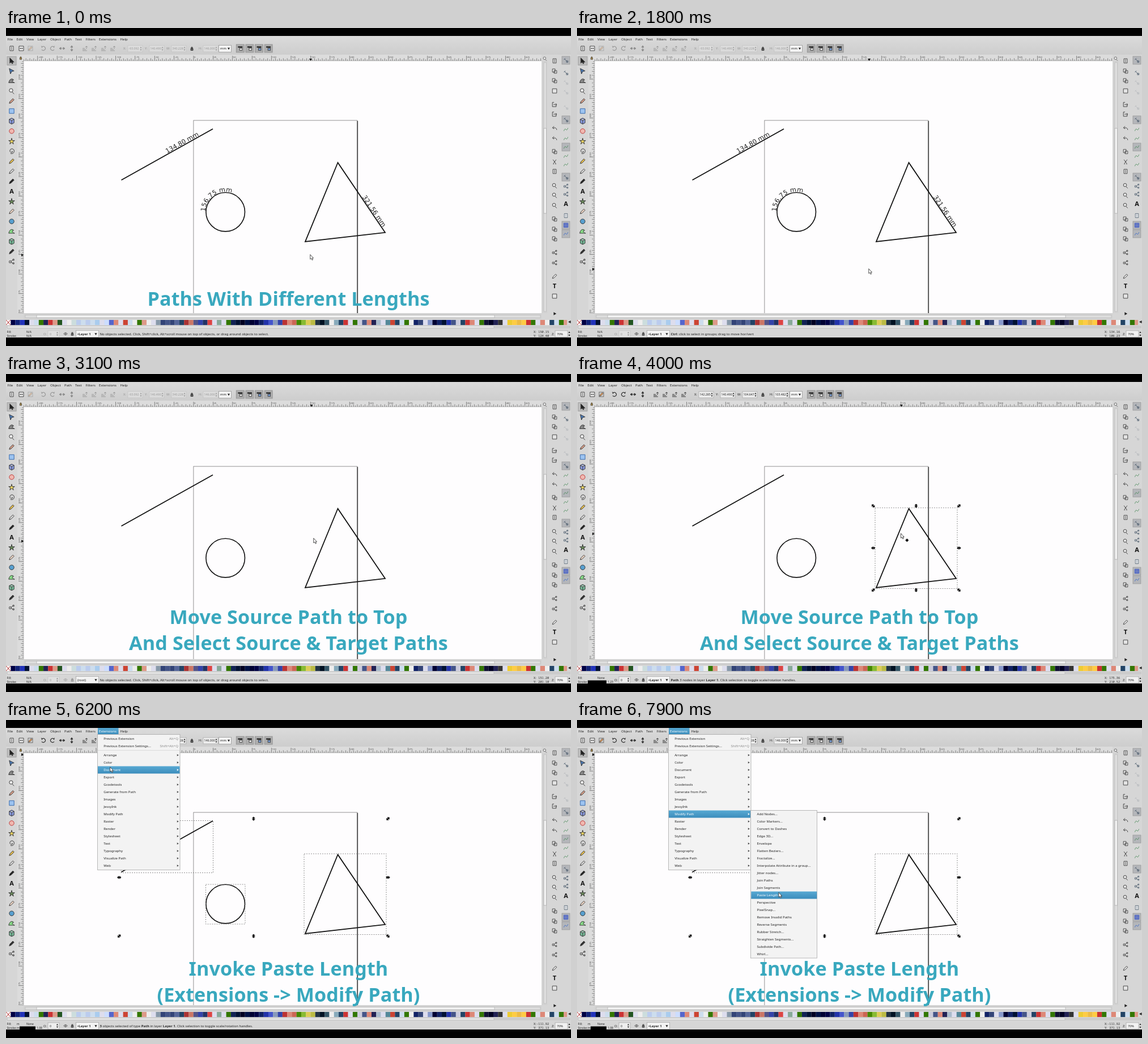
Recreate the animation shown at these times as an HTML page with a canvas. Size 997 by 561 pixels, loop 8000 ms.

```html
<!DOCTYPE html>
<html lang="en">
<head>
<meta charset="utf-8">
<title>Paste Length</title>
<style>
html, body { margin: 0; width: 100%; height: 100%; overflow: hidden; background: #000; }
canvas { display: block; width: 997px; height: 561px; }
</style>
</head>
<body>
<canvas id="stage" width="997" height="561"></canvas>
<script>
const ctx = document.getElementById('stage').getContext('2d');
const LOOP = 8000, SCALE = 1.376, PAGE_X = 331, PAGE_Y = 163;
const CUT = 2400, MENU = 5900, SUBMENU = 6500;
const SANS = '"Noto Sans", sans-serif';

// time, x, y of the pointer tip; equal times make a jump
const PATH = [
  [0, 537.6, 400.5], [100, 537.6, 400.5], [700, 515.6, 425.5], [CUT, 515.6, 425.5],
  [CUT, 530, 335], [3000, 539, 295], [3100, 543.5, 290.5], [3450, 572.3, 282], [4100, 572.3, 282],
  [4450, 416, 306], [4600, 416, 306], [4950, 300, 214], [5080, 300, 214], [5300, 200, 86],
  [5400, 187.5, 75.5], [5500, 177, 61], [5800, 180, 18], [6000, 180, 19], [6450, 190, 164],
  [6600, 225, 166], [6800, 283.5, 181], [7100, 335, 199], [7700, 356, 302], [7900, 356.7, 305]
];
const GLYPH = {
  arrow: 'M-3-5V4L-1 2L1 5L2 4L1 2H4Z',
  node: 'M-4-4L4 0L0 1L-2 5Z',
  wave: 'M-5 3Q-3-5 2-3Q5-1 1-1Q1 2 5 3Z',
  lens: 'M2-1A3 3 0 1 1-4-1A3 3 0 1 1 2-1M1 2L4 5',
  pen: 'M-4 4L-3 1L2-4L4-2L-1 3Z',
  box: 'M-4-4H4V4H-4Z',
  cube: 'M0-5L4-3V3L0 5L-4 3V-3ZM-4-3L0-1L4-3M0-1V5',
  disc: 'M4 0A4 4 0 1 1-4 0A4 4 0 1 1 4 0Z',
  star: 'M0-5L1-1H5L2 1L3 5L0 2L-3 5L-2 1L-5-1H-1Z',
  spiral: 'M0 0Q2 0 1 2Q-2 3-3 0Q-3-4 1-4Q5-3 4 1Q3 5-2 4',
  page: 'M-3-4H3V4H-3ZM-1-2H1M-1 0H1M-1 2H1',
  turn: 'M-3 2A3.5 3.5 0 1 0-2-3M-4-4L-2-3L-3-1',
  flip: 'M-5 0L-2-2V2ZM5 0L2-2V2ZM-2 0H2',
  stack: 'M-4 4H4M-4 2H2M-4 0H0M3-4V1M1-2L3-4L5-2',
  copy: 'M-4-4H1V2H-4ZM-1-1H4V4H-1Z',
  out: 'M-1-4H-4V4H3V1M-2 0H4M2-2L4 0L2 2',
  undo: 'M4 3Q4-2-3-1M-1-4L-4-1L-1 1',
  cut: 'M-3-4L2 3M3-4L-2 3M-3 4H-1M1 4H3',
  snap: 'M-3-3L3 3M-4-1L-1-4M1 1H4V4H1Z',
  curve: 'M-4 3Q-2-3 0 0T4-3',
  grid: 'M-4-4H4V4H-4ZM-1.5-4V4M1.5-4V4M-4-1.5H4M-4 1.5H4',
  nodes: 'M-4-1H-1V2H-4ZM2-4H4V-2H2ZM2 2H4V4H2ZM-1 0L2-3M-1 1L2 3',
  eye: 'M-3 0Q0-4 3 0Q0 4-3 0M1 0H-1',
  lock: 'M-2 0H2V3H-2ZM-1.4 0V-2Q0-4 1.4-2V0',
  double: 'M-4 0L-1-3V-1H1V-3L4 0L1 3V1H-1V3Z',
  cursor: 'M0 0V8.6L2 7L3.5 10.2L5 9.4L3.6 6.5H6Z'
};
for (const k in GLYPH) GLYPH[k] = new Path2D(GLYPH[k]);

const TOOLS = `arrow #222,node #4b79b5,wave #888,lens #eee,pen #d9a08a,box #9cc3f0,cube #8a9be0,disc #f0b8b0,
star #f0d860,spiral none,pen #e8c050,pen #ddd,pen #222,A,star #6a8a5a,pen #f0d8c8,disc #58a0d0,wave #8d8,
cube #7b9,pen #333,nodes #eee`.split(/,\s*/);
const COMMANDS = `page 58,copy 76,copy 93,box 111,out 135,out 152,undo 177,undo 195,copy 218,cut 236,page 253,
lens 278,lens 295,lens 313,copy 337,copy 355,copy 372,nodes 396,nodes 414,pen 438,T 455,box 473`.split(/,\s*/);
const SNAPS = `snap 57 1,snap 79,snap 96,snap 113,snap 140,snap 162 1,curve 179,curve 195,curve 210 1,curve 226,
curve 241,snap 263 1,nodes 279,nodes 293,A 310,page 331,grid 348 1,curve 363 1`.split(/,\s*/);
const SWATCHES = `004 127 23b 013 dde cde 370 225 c33 d98 252 dde eee cdd bce cde bce cde ace dde cdf 56c d87 dde
c43 cde eee 370 d98 eee dde 89a 347 458 347 569 246 a33 c76 558 34a 236 d44 dde 8a9 dde 370 125 013 002 014 003
004 126 23a 45c 89b 34a b33 d87 c65 480 8b3 dc5 bb4 234 012 356 eee 8ab 246 c33 dde 370 ccd 458 d87 225 abc
dde 589 c43 246 cde 370 eee 126 347 dde 89c 003 126 013 23a 458 ccd 246 c33 d87 dde 370 113 002 225 333 dde
ec3 fc4 eb4 fc4 c33 370 dde d87 eee 246 cde 370 d98 dde`.split(/\s+/);
const GROUPS = `Arrange,Color,Document,Export,Gcodetools,Generate from Path,Images,JessyInk,Modify Path,Raster,
Render,Stylesheet,Text,Typography,Visualize Path,Web`.split(/,\s*/);
const EFFECTS = `Add Nodes...,Color Markers...,Convert to Dashes,Edge 3D...,Envelope,Flatten Beziers...,Fractalize...,
Interpolate Attribute in a group...,Jitter nodes...,Join Paths,Join Segments,Paste Length...,Perspective,PixelSnap...,
Remove Invalid Paths,Reverse Segments,Rubber Stretch...,Straighten Segments...,Subdivide Path...,Whirl...`.split(/,\s*/);

const BOXES = [[526, 236, 671, 378.5], [352.5, 290, 422, 360], [203, 177.5, 365.5, 269.5]];
const SIZES = [
  ['-93.092', '140.490', '340.228', '146.000'], ['142.285', '140.490', '104.647', '103.482'],
  ['15.625', '140.490', '231.307', '103.482'], ['-93.092', '140.490', '340.228', '146.000']
];
const TOGGLE = ' Click selection to toggle scale/rotation handles.';
const IDLE = 'No objects selected. Click, Shift+click, Alt+scroll mouse on top of objects, or drag around objects to select.';

function rect(x, y, w, h, fill, stroke) {
  if (fill) { ctx.fillStyle = fill; ctx.fillRect(x, y, w, h); }
  if (stroke) { ctx.strokeStyle = stroke; ctx.lineWidth = 0.8; ctx.strokeRect(x, y, w, h); }
}

function shade(x, y, w, h, top, bottom) {
  const g = ctx.createLinearGradient(0, y, 0, y + h);
  g.addColorStop(0, top);
  g.addColorStop(1, bottom);
  rect(x, y, w, h, g);
}

// Set at ten times the size and scaled down, so small type keeps its spacing.
function text(s, x, y, size = 6.1, { color = '#222', align = 'left', weight = 400, angle = 0, family = SANS } = {}) {
  ctx.save();
  ctx.translate(x, y);
  ctx.rotate(angle);
  ctx.scale(0.1, 0.1);
  ctx.font = `${weight} ${size * 10}px ${family}`;
  ctx.textAlign = align;
  ctx.fillStyle = color;
  ctx.fillText(s, 0, 0);
  const width = ctx.measureText(s).width / 10;
  ctx.restore();
  return width;
}

function icon(name, x, y, fill = 'none', { stroke = '#333', size = 1, angle = 0, line = 0.9 } = {}) {
  if (name === 'A' || name === 'T') {
    text(name, x, y + 4, 11, { align: 'center', weight: 700, color: '#111' });
    return;
  }
  ctx.save();
  ctx.translate(x, y);
  ctx.rotate(angle);
  ctx.scale(size, size);
  if (fill !== 'none') { ctx.fillStyle = fill; ctx.fill(GLYPH[name]); }
  ctx.strokeStyle = stroke;
  ctx.lineWidth = line;
  if (line) ctx.stroke(GLYPH[name]);
  ctx.restore();
}

function polyline(points, width, close) {
  ctx.beginPath();
  points.forEach(p => ctx.lineTo(...p));
  if (close) ctx.closePath();
  ctx.strokeStyle = '#111';
  ctx.lineWidth = width;
  ctx.stroke();
}

function triangle(x, y, r, angle, color = '#222') {
  ctx.beginPath();
  for (let i = 0; i < 3; i++) {
    const a = angle + i * Math.PI * 2 / 3;
    ctx.lineTo(x + r * Math.cos(a), y + r * Math.sin(a));
  }
  ctx.fillStyle = color;
  ctx.fill();
}

function pointer(t) {
  let i = PATH.length - 1;
  while (i > 0 && PATH[i][0] > t) i--;
  const a = PATH[i], b = PATH[i + 1] || a;
  const f = b === a ? 0 : (t - a[0]) / (b[0] - a[0]);
  return [a[1] + (b[1] - a[1]) * f, a[2] + (b[2] - a[2]) * f];
}

function drawLabels() {
  const size = 11.2, font = { family: '"DejaVu Sans", sans-serif', color: '#222' };
  text('134.80 mm', 284.3, 221.2, size, { ...font, angle: Math.atan2(-90, 161) });
  text('321.56 mm', 628.5, 298.3, size, { ...font, angle: Math.atan2(123.5, 83.5) });
  let arc = 0.6;
  for (const ch of '156.75 mm') {
    ctx.font = `${size * 10}px ${font.family}`;
    const w = ctx.measureText(ch).width / 10;
    const a = Math.PI + (arc + w / 2) / 34.3;
    ctx.save();
    ctx.translate(387.2 + 35.6 * Math.cos(a), 324.5 + 35.6 * Math.sin(a));
    ctx.rotate(a + Math.PI / 2);
    text(ch, -w / 2, 0, size, font);
    ctx.restore();
    arc += w;
  }
}

function drawSelection(count) {
  const boxes = BOXES.slice(0, count);
  ctx.setLineDash([2, 2]);
  for (const [l, t, r, b] of boxes) rect(l, t, r - l, b - t, null, '#777');
  ctx.setLineDash([]);
  const edge = (k, pick, pad) => pick(...boxes.map(b => b[k])) + pad;
  const l = edge(0, Math.min, -3.3), t = edge(1, Math.min, -3.3);
  const r = edge(2, Math.max, 3), b = edge(3, Math.max, 2.7);
  const style = angle => ({ angle, size: 0.85, line: 0.5, stroke: '#000' });
  for (let i = 0; i < 3; i++) for (let j = 0; j < 3; j++) {
    if (i === 1 && j === 1) continue;
    const angle = i === 1 ? Math.PI / 2 : j === 1 ? 0 : (i === j ? 1 : -1) * Math.PI / 4;
    icon('double', l + (r - l) * i / 2, t + (b - t) * j / 2, '#000', style(angle));
  }
}

function drawDocument(t, selected) {
  ctx.save();
  ctx.beginPath();
  ctx.rect(31, 58, 914, 445);
  ctx.clip();
  rect(31, 58, 914, 445, '#fefdfe');
  rect(330.9, 163, 289, 400, null, '#777');
  rect(619.4, 164, 1.7, 400, '#4a4a4a');
  polyline([[203.5, 268.2], [365, 178]], 1.7);
  polyline([[585.5, 237.5], [528, 377], [669, 360.8]], 1.8, true);
  ctx.beginPath();
  ctx.arc(387.2, 324.6, 34.3, 0, 7);
  ctx.lineWidth = 1.6;
  ctx.stroke();
  if (t < CUT) drawLabels();
  if (selected) drawSelection(selected);
  ctx.restore();
}

function drawRulers([mx, my]) {
  rect(20, 47, 925, 11, '#dcdcdc');
  rect(20, 58, 11, 445, '#dcdcdc');
  ctx.save();
  ctx.beginPath();
  ctx.rect(31, 47, 914, 11);
  ctx.rect(20, 58, 11, 445);
  ctx.clip();
  const step = 2.5 * SCALE;
  for (let i = -90; i < 180; i++) {
    const len = i % 10 === 0 ? 9 : i % 2 ? 2.5 : 4.5;
    const x = PAGE_X + i * step, y = PAGE_Y + (297 - i * 2.5) * SCALE;
    rect(x - 0.3, 58 - len, 0.6, len, '#444');
    rect(31 - len, y - 0.3, len, 0.6, '#444');
    if (i % 10 === 0) {
      text(String(i * 2.5), x + 1, 53, 4.3, { color: '#555' });
      text(String(i * 2.5), 25, y - 1, 4.3, { color: '#555', angle: -Math.PI / 2 });
    }
  }
  triangle(mx, 55.6, 3, Math.PI / 2);
  triangle(28.5, my, 3, 0);
  ctx.restore();
  rect(31, 57.6, 914, 0.6, '#999');
  rect(30.7, 58, 0.6, 445, '#999');
}

function drawToolbar(selected) {
  const menus = { File: 2.5, Edit: 18.5, View: 36, Layer: 55.5, Object: 78, Path: 103, Text: 122, Filters: 140.5, Extensions: 164, Help: 201.5 };
  shade(0, 14, 997, 33, '#dbdbdb', '#cdcdcd');
  for (const name in menus) text(name, menus[name], 21.8);
  icon('page', 10, 36, '#eee');
  icon('box', 27, 36, '#eee');
  icon('flip', 27, 36, '#333', { size: 0.5 });
  ctx.globalAlpha = selected ? 1 : 0.35;
  icon('pen', 43, 36, '#e8a060', { size: 0.8 });
  rect(39, 32, 8, 8, null, '#555');
  icon('turn', 66, 36, 'none', { line: 1.2 });
  ctx.save();
  ctx.translate(82, 36);
  ctx.scale(-1, 1);
  icon('turn', 0, 0, 'none', { line: 1.2 });
  ctx.restore();
  icon('flip', 99, 36, '#333');
  icon('flip', 116, 36, '#333', { angle: Math.PI / 2 });
  [139, 155, 172, 188].forEach(x => icon('stack', x, 36));
  [207, 245, 283, 340].forEach((x, i) => {
    const left = [215, 253, 292, 348][i];
    text('XYWH'[i] + ':', x, 38.4, 5.6);
    rect(left, 31, 26, 11, '#eee', '#aaa');
    text(SIZES[selected][i], left + 1.5, 38.3, 5.2);
    triangle(left + 23, 34.5, 1.8, -Math.PI / 2);
    triangle(left + 23, 38.5, 1.8, Math.PI / 2);
  });
  ctx.globalAlpha = 1;
  icon('lock', 328, 36.5, '#666');
  rect(375.5, 30.5, 22, 12, '#f4f4f4', '#999');
  text('mm', 378, 38.4, 5.8);
  triangle(393, 36, 2.4, Math.PI / 2);
  for (let i = 0; i < 4; i++) {
    const x = 413.3 + i * 16.6;
    rect(x - 7, 29, 14, 14, '#adadad', '#8c8c8c');
    rect(x - 4, 32.5, 8, 2, '#111');
    rect(x - 1, 35.5, 4.5, 4, i > 1 ? '#79c' : '#ddd', '#333');
  }
}

function drawSides() {
  rect(2, 50.5, 16, 15, '#bcbcbc', '#999');
  TOOLS.forEach((entry, i) => {
    const [name, fill] = entry.split(' ');
    const outline = name === 'disc' && i < 10 ? '#b33' : name === 'box' ? '#36a' : '#333';
    icon(name, 10, 58 + 17.7 * i, fill, { size: 1.05, stroke: outline });
  });
  icon('lock', 26, 53, '#c8a050', { size: 0.8 });
  rect(946, 58, 9.5, 445, '#d2d2d2');
  rect(949, 61, 4.5, 439, '#dedede', '#bdbdbd');
  rect(949, 177, 4.5, 150, '#f3f3f3', '#aaa');
  icon('lens', 951, 54, '#eee', { size: 0.75 });
  for (const entry of COMMANDS) {
    const [name, y] = entry.split(' ');
    icon(name, 968, +y, /undo|cut|out/.test(name) ? 'none' : '#e4e4e4', { size: 0.95 });
  }
  triangle(968, 504, 3.2, 0);
  for (const entry of SNAPS) {
    const [name, y, on] = entry.split(' ');
    if (on) rect(981, y - 7, 14, 14, '#b4b6ba', '#999');
    ctx.globalAlpha = /^(96|113|140)$/.test(y) ? 0.2 : 1;
    icon(name, 988, +y, name === 'page' ? '#fff' : 'none', {
      stroke: name === 'curve' ? (y === '363' ? '#36c' : '#485') : name === 'grid' ? '#24c' : '#456', size: 0.9
    });
    ctx.globalAlpha = 1;
  }
}

function drawPalette() {
  rect(31, 503, 914, 11, '#d2d2d2');
  rect(34, 506.5, 909, 4.5, '#dedede', '#bdbdbd');
  rect(54, 506.5, 808, 4.5, '#f3f3f3', '#b5b5b5');
  const w = 8.27;
  for (let i = 0; i < 120; i++) rect(8.2 + i * w, 515, w, 9, '#' + SWATCHES[i % SWATCHES.length]);
  rect(0, 515, 8.2, 9, '#fff');
  ctx.beginPath();
  ctx.moveTo(0, 515); ctx.lineTo(8, 524);
  ctx.moveTo(8, 515); ctx.lineTo(0, 524);
  ctx.strokeStyle = '#a22';
  ctx.lineWidth = 1;
  ctx.stroke();
  rect(990, 514, 7, 11, '#d6d6d6');
  triangle(995, 518.5, 3, Math.PI);
  rect(2, 526, 993, 3, '#d0d0d0', '#bdbdbd');
  rect(2, 526, 859, 3, '#f1f1f1', '#bbb');
}

function message(t, selected, hover) {
  if (hover) return '';
  if (selected === 1) return '*Path* 3 nodes in layer *Layer 1*.' + TOGGLE;
  if (selected) return `*${selected}* objects selected of type *Path* in layer *Layer 1*.` + TOGGLE;
  return t >= 1400 && t < CUT ? '*Ctrl*: click to select in groups; drag to move hor/vert' : IDLE;
}

function drawStatus(t, selected, [mx, my], hover) {
  text('Fill:', 1.5, 538, 5.2);
  text('Stroke:', 1.5, 545, 5.2);
  if (selected) {
    if (selected > 1) { text('m', 19, 538, 5); text('m', 19, 545, 5); }
    text('None', 36, 538, 5);
    const left = selected > 1 ? 24 : 19;
    rect(left, 540.5, 52 - left, 5.5, '#000');
    text(selected === 1 ? '1.23' : '1.08', 54, 545, 5);
  } else {
    text('N/A', 36, 538, 5);
    text('N/A', 36, 545, 5);
  }
  ctx.globalAlpha = selected ? 1 : 0.4;
  text('O:', 66, 541.6, 5.6);
  rect(74, 534, 20, 11, '#eee', '#aaa');
  text('0', 77, 541.6, 5.4);
  triangle(90.5, 537.5, 1.8, -Math.PI / 2);
  triangle(90.5, 541.5, 1.8, Math.PI / 2);
  const root = t >= CUT && !selected;
  ctx.globalAlpha = root ? 0.35 : 1;
  icon('eye', 105, 539.5);
  icon('lock', 117, 539.5, '#777', { size: 0.9 });
  ctx.globalAlpha = 1;
  rect(123.5, 533.5, 40, 12, '#f2f2f2', '#aaa');
  text(root ? '(root)' : '•Layer 1', 126, 541.7, 5.9, { weight: root ? 400 : 600 });
  triangle(158.5, 539.5, 2.4, Math.PI / 2);
  let x = 165.5;
  message(t, selected, hover).split('*').forEach((part, i) => {
    x += text(part, x, 541.7, 6.05, { weight: i % 2 ? 700 : 400 });
  });
  const mono = { family: '"Noto Sans Mono", monospace', align: 'right', weight: 500 };
  text('X:', 931, 538, 5.4);
  text('Y:', 931, 545, 5.4);
  text(((mx - PAGE_X) / SCALE).toFixed(2), 958, 538, 5.2, mono);
  text((297 - (my - PAGE_Y) / SCALE).toFixed(2), 958, 545, 5.2, mono);
  text('Z:', 963, 541.7, 5.4);
  rect(969, 534, 22, 11, '#f2f2f2', '#aaa');
  text('70%', 972, 541.7, 5.4);
  triangle(994, 537, 1.8, -Math.PI / 2);
  triangle(994, 542, 1.8, Math.PI / 2);
}

const highlight = (x, y, w, h) => shade(x, y, w, h, '#58a9d3', '#3c8dbc');

function drawMenu(t, [, y], effect) {
  const row = (label, x, mid, lit, w) => {
    if (lit) highlight(x - 10.2, mid - 6.5, w, 13);
    text(label, x, mid + 2.2, 6.1, { color: lit ? '#fff' : '#222' });
  };
  highlight(162, 14, 36.5, 11.5);
  text('Extensions', 164, 21.8, 6.1, { color: '#fff' });
  rect(161.5, 25.5, 145.5, 239, '#f3f3f3', '#a8a8a8');
  row('Previous Extension', 172.2, 32.5);
  row('Previous Extension Settings...', 172.2, 45.5);
  text('Alt+Q', 304, 34.7, 6.1, { align: 'right', color: '#888' });
  text('Shift+Alt+Q', 304, 47.7, 6.1, { align: 'right', color: '#888' });
  rect(162, 53.3, 144.5, 0.7, '#d2d2d2');
  const open = t >= SUBMENU, current = open ? 8 : Math.round((y - 62) / 13);
  GROUPS.forEach((label, i) => {
    const mid = 62 + i * 13;
    row(label, 172.2, mid, i === current, 144.5);
    triangle(302.8, mid, 2, 0, i === current ? '#fff' : '#444');
  });
  if (!open) return;
  rect(306.5, 159.5, 117, 260.5, '#f3f3f3', '#a8a8a8');
  EFFECTS.forEach((label, i) => row(label, 317.5, 166 + i * 13, i === effect, 116));
}

function drawCaption(t) {
  const lines = t < 1000 ? [[490, 'Paths With Different Lengths']]
    : t < CUT ? []
    : t < MENU ? [[440.5, 'Move Source Path to Top'], [487.2, 'And Select Source & Target Paths']]
    : [[450.5, 'Invoke Paste Length'], [497.2, '(Extensions -> Modify Path)']];
  for (const [y, s] of lines) text(s, 498.5, y, 34.3, { color: '#39a8be', align: 'center', weight: 700 });
}

function draw(t) {
  const tip = pointer(t);
  const mark = pointer(Math.max(0, Math.min(t - 100, 5500)));
  const selected = t < 3500 ? 0 : t < 4500 ? 1 : t < 5000 ? 2 : 3;
  const effect = t >= SUBMENU && tip[0] > 307 ? Math.round((tip[1] - 166) / 13) : -1;
  rect(0, 0, 997, 561, '#000');
  rect(0, 14, 997, 532, '#d6d6d6');
  drawDocument(t, selected);
  drawToolbar(selected);
  drawRulers(mark);
  drawSides();
  drawPalette();
  drawStatus(t, selected, mark, effect >= 0);
  if (t >= MENU) drawMenu(t, tip, effect);
  drawCaption(t);
  icon('cursor', tip[0] - 0.8, tip[1] - 0.8, '#fff', { stroke: '#333', size: 0.96 });
  const resting = [[3450, 4100], [4450, 4600], [4950, 5080]].some(([a, b]) => t >= a && t < b);
  if (resting) {
    const [x, y] = [tip[0] + 10, tip[1] + 11.3];
    icon('double', x, y, '#111', { size: 0.75, line: 0 });
    icon('double', x, y, '#111', { size: 0.75, line: 0, angle: Math.PI / 2 });
  }
}

const start = performance.now();
function tick() {
  draw((performance.now() - start) % LOOP);
  requestAnimationFrame(tick);
}
tick();
</script>
</body>
</html>
```
